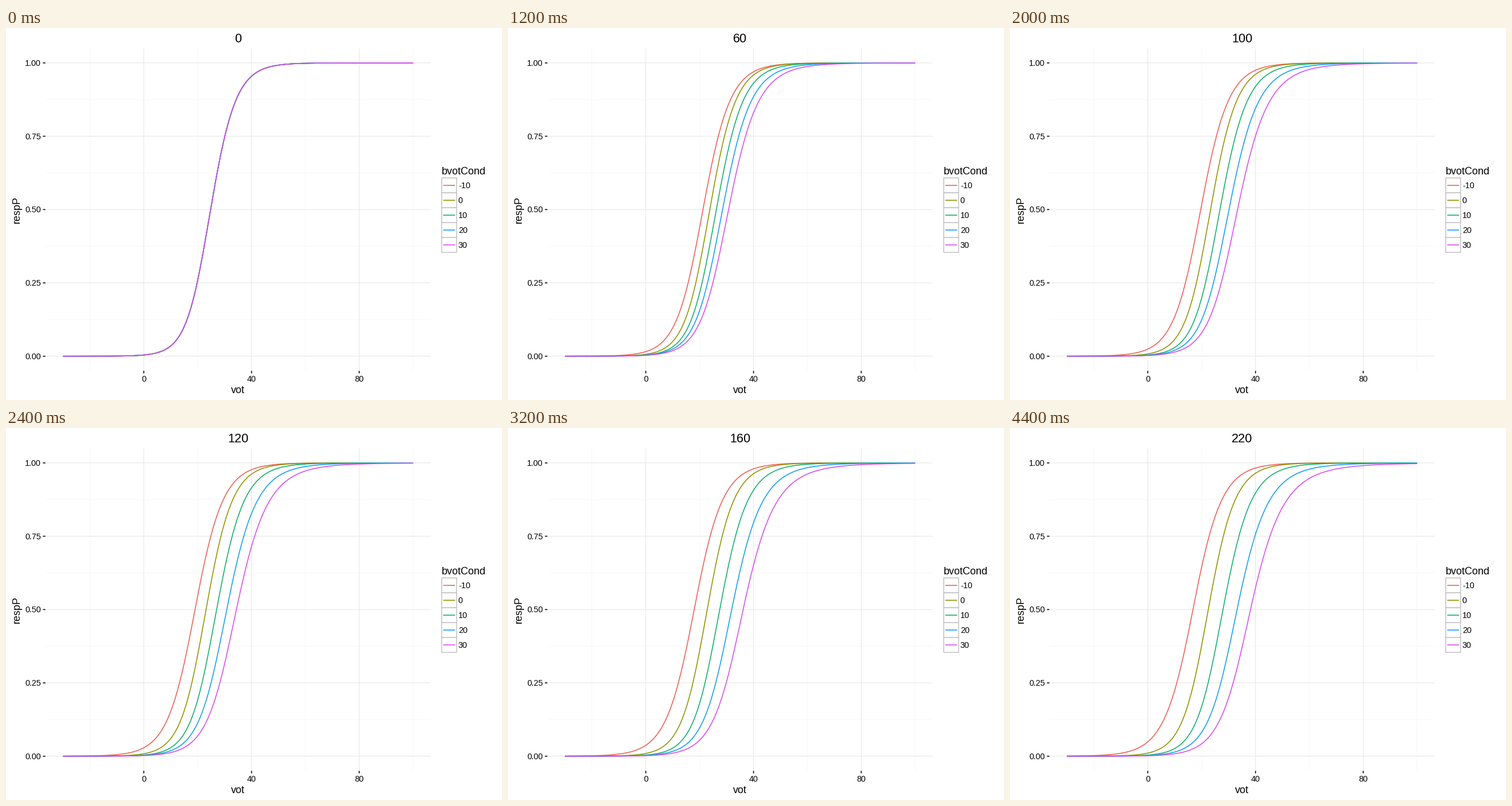
Recreate the animation shown at these times as a matplotlib script. Size 864 by 648 pixels, loop 4.6 s.

```python
import numpy as np
import matplotlib.pyplot as plt
from matplotlib.animation import FuncAnimation
from matplotlib.patches import Rectangle

W, H, DPI = 864, 648, 100
FRAMES, STEP_MS = 23, 200
PX = 72 / DPI  # points per pixel

CONDS = [-10, 0, 10, 20, 30]
COLORS = ["#f25d55", "#8f9300", "#10b068", "#149df3", "#d94cee"]
LEFT, RIGHT, TOP, BOTTOM = 68.6, 740, 36, 597.3

plt.rcParams["font.family"] = "Liberation Sans"
fig = plt.figure(figsize=(W / DPI, H / DPI), dpi=DPI, facecolor="white")
ax = fig.add_axes([0, 0, 1, 1])
ax.set_xlim(0, W)
ax.set_ylim(H, 0)
ax.axis("off")


def sx(vot):
    return 240 + 4.6915 * vot


def sy(p):
    return 571.7 - 510.9 * p


def line(xs, ys, color, width, **kw):
    kw.setdefault("solid_capstyle", "butt")
    return ax.plot(xs, ys, color=color, lw=width * PX, snap=False, **kw)[0]


def text(x, y, s, size, color="black", **kw):
    return ax.text(x, y, s, fontsize=size * PX, color=color,
                   va="baseline", **kw)


def grid(xs, ys, color, width):
    for v in xs:
        line([sx(v)] * 2, [TOP, BOTTOM], color, width, zorder=1)
    for p in ys:
        line([LEFT, RIGHT], [sy(p)] * 2, color, width, zorder=1)


def response(vot, cond, trials):
    """Category boundary drifts towards the exposure; the slope softens."""
    d = cond - 5
    shift = trials / (trials + 195) * (0.8 + 1.03 * d - 0.0022 * d * d)
    up, down = max(shift, 0), max(-shift, 0)
    u = vot - 24.8 - shift
    right, left = np.maximum(u, 0), np.maximum(-u, 0)

    width = 4.72 + 0.22 * up ** 0.7 + 0.147 * down ** 0.7
    width = width + (0.018 + 0.0038 * up) * right + 0.00225 * down * left
    dip = 0.05 * np.clip(1 - down / 8, 0, 1)
    width = width - dip * left * np.exp(-left / 14)
    return 1 / (1 + np.exp(-u / width))


grid([-20, 20, 60, 100], [0.125, 0.375, 0.625, 0.875], "#fafafa", 1.6)
grid([0, 40, 80], [0, 0.25, 0.5, 0.75, 1], "#e2e2e2", 0.9)

for v in (0, 40, 80):
    line([sx(v)] * 2, [BOTTOM, BOTTOM + 4.2], "black", 1.6)
    text(sx(v), 616, str(v), 14.4, ha="center")
for p in (0, 0.25, 0.5, 0.75, 1):
    line([LEFT - 4.2, LEFT], [sy(p)] * 2, "black", 1.6)
    text(60.8, sy(p) + 5.2, f"{p:.2f}", 14.4, ha="right")

text(404.3, 636, "vot", 18, ha="center")
text(24.2, 316.5, "respP", 18, ha="center", rotation=90,
     rotation_mode="anchor")

text(758.8, 255.2, "bvotCond", 18)
for i, (cond, color) in enumerate(zip(CONDS, COLORS)):
    y = 261.2 + 25.92 * i
    ax.add_patch(Rectangle((759, y), 25.92, 25.92, fc="white", ec="#c4c4c4",
                           lw=1.6 * PX, snap=False, zorder=2))
    line([761.6, 782.3], [y + 12.96] * 2, color, 1.6, zorder=3)
    text(788, y + 18.2, str(cond), 14.4)

title = text(404.3, 24.8, "", 21.6, ha="center")
vots = np.linspace(-30, 100, 261)
curves = [line(sx(vots), sy(vots * 0), c, 1.6, zorder=4 + i)
          for i, c in enumerate(COLORS)]


def update(frame):
    trials = 10 * frame
    title.set_text(str(trials))
    for curve, cond in zip(curves, CONDS):
        curve.set_ydata(sy(response(vots, cond, trials)))
    return [title, *curves]


anim = FuncAnimation(fig, update, frames=FRAMES, interval=STEP_MS,
                     repeat=True, repeat_delay=0, blit=False)
plt.show()
```
